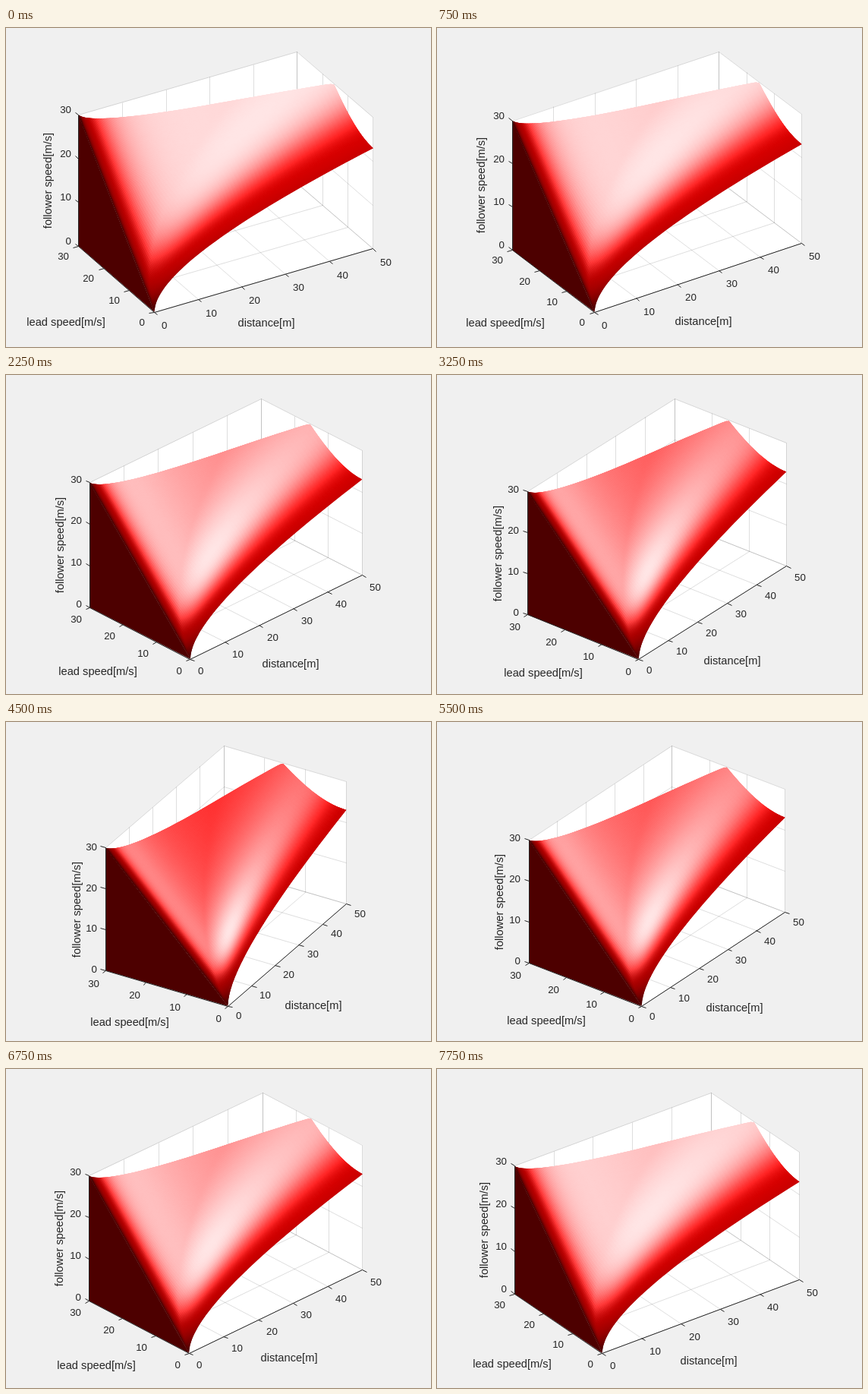
Write an HTML page with a canvas that moves like this. It is 560x420 px and loops after 8000 ms.

```html
<!DOCTYPE html>
<html lang="en">
<head>
<meta charset="utf-8">
<title>Safe following speed surface</title>
<style>
  html, body { margin: 0; width: 100%; height: 100%; overflow: hidden; background: #f0f0f0; }
  canvas, svg { position: absolute; left: 0; top: 0; width: 560px; height: 420px; }
  text { font: 13.33px "Liberation Sans", Arial, sans-serif; fill: #262626; }
  text.label { font-size: 14.67px; text-anchor: middle; }
</style>
</head>
<body>
<canvas id="plot" width="560" height="420"></canvas>
<svg id="labels" viewBox="0 0 560 420"></svg>
<script>
const LOOP = 8000, STEP = 250, TURN = 17;
const MAX_X = 50, MAX_Y = 30, MAX_Z = 30;
const LEAD_BRAKE = 3.5, FOLLOW_BRAKE = 5.3;
const BOX = { cx: 289.8, bottom: 374, height: 342.5 };
const SIN_EL = 0.5, COS_EL = Math.sqrt(3) / 2;
const LIGHT_TURN = Math.PI / 10;
const LIGHT = [0.5 * Math.sin(LIGHT_TURN), -0.5 * Math.cos(LIGHT_TURN), COS_EL];
const COLS = 120, ROWS = 80, TICK = 1.2;

const ctx = document.getElementById("plot").getContext("2d");
const svg = document.getElementById("labels");
const dot = (a, b) => a[0] * b[0] + a[1] * b[1] + a[2] * b[2];
const range = max => Array.from({ length: max / 10 + 1 }, (_, i) => i * 10);

// Distance needed when the lead car brakes, with its slopes in y and z.
function gap(y, z) {
  if (z <= y) return [0, 0, 0];
  if (z / FOLLOW_BRAKE <= y / LEAD_BRAKE) {
    const diff = FOLLOW_BRAKE - LEAD_BRAKE, slope = (z - y) / diff;
    return [(z - y) * slope / 2, -slope, slope];
  }
  return [
    z * z / (2 * FOLLOW_BRAKE) - y * y / (2 * LEAD_BRAKE),
    -y / LEAD_BRAKE,
    z / FOLLOW_BRAKE
  ];
}

function topSpeed(y) {
  const reach = MAX_X + y * y / (2 * LEAD_BRAKE);
  return Math.min(MAX_Z, Math.sqrt(2 * FOLLOW_BRAKE * reach));
}

function vertex(i, j) {
  const y = MAX_Y * i / COLS;
  const z = y + (topSpeed(y) - y) * j / ROWS;
  const [x, dy, dz] = gap(y, z);
  const len = Math.hypot(1, dy, dz);
  return { pos: [x, y, z], normal: [-1 / len, dy / len, dz / len] };
}

const mesh = Array.from({ length: COLS + 1 }, (_, i) =>
  Array.from({ length: ROWS + 1 }, (_, j) => vertex(i, j)));

function shade(normal, eye) {
  const facing = Math.max(0, dot(normal, LIGHT));
  const mirror = normal.map((n, i) => 2 * facing * n - LIGHT[i]);
  const shine = facing > 0 ? 0.9 * Math.max(0, dot(mirror, eye)) ** 10 : 0;
  return [0.3 + 0.6 * facing + shine, shine];
}

function camera(deg) {
  const a = deg * Math.PI / 180, sin = Math.sin(a), cos = Math.cos(a);
  const scale = BOX.height / ((MAX_X * sin + MAX_Y * cos) * SIN_EL + MAX_Z * COS_EL);
  const left = BOX.cx - scale * (MAX_X * cos + MAX_Y * sin) / 2;
  const originX = left + scale * MAX_Y * sin;
  return {
    sin, cos, turn: deg - 30,
    eye: [-sin * COS_EL, -cos * COS_EL, SIN_EL],
    project: (x, y, z) => [
      originX + scale * (x * cos - y * sin),
      BOX.bottom - scale * ((x * sin + y * cos) * SIN_EL + z * COS_EL)
    ]
  };
}

function trace(points) {
  ctx.beginPath();
  points.forEach(([x, y]) => ctx.lineTo(x, y));
}

function polygon(points, fill) {
  trace(points);
  ctx.closePath();
  ctx.fillStyle = fill;
  ctx.fill();
}

// Line ends sit on pixel centres, so upright lines stay sharp.
function line(cam, from, to) {
  const ends = [from, to].map(p => cam.project(...p).map(v => Math.floor(v) + 0.5));
  trace(ends);
  ctx.stroke();
}

function drawWalls(cam) {
  const corners = [[0, 0, 0], [0, 30, 0], [0, 30, 30], [50, 30, 30], [50, 0, 30], [50, 0, 0]];
  polygon(corners.map(c => cam.project(...c)), "#fff");
  ctx.strokeStyle = "rgba(38,38,38,.15)";
  ctx.lineWidth = 1;
  for (const x of range(MAX_X)) {
    line(cam, [x, 0, 0], [x, MAX_Y, 0]);
    line(cam, [x, MAX_Y, 0], [x, MAX_Y, MAX_Z]);
  }
  for (const y of range(MAX_Y)) {
    line(cam, [0, y, 0], [MAX_X, y, 0]);
    line(cam, [MAX_X, y, 0], [MAX_X, y, MAX_Z]);
  }
  for (const z of range(MAX_Z)) {
    line(cam, [0, MAX_Y, z], [MAX_X, MAX_Y, z]);
    line(cam, [MAX_X, 0, z], [MAX_X, MAX_Y, z]);
  }
}

function drawSurface(cam) {
  const wall = [[0, 0, 0], [0, 30, 0], [0, 30, 30]];
  polygon(wall.map(c => cam.project(...c)), "#4d0000");
  const view = mesh.map(col => col.map(v => ({
    at: cam.project(...v.pos), tone: shade(v.normal, cam.eye)
  })));
  // Each patch reaches under the next ones, which hides the seams.
  for (let i = 0; i < COLS; i++) {
    for (let j = 0; j < ROWS; j++) {
      const far = view[Math.min(i + 2, COLS)], up = Math.min(j + 2, ROWS);
      const patch = [view[i][j], far[j], far[up], view[i][up]];
      const near = [view[i][j], view[i + 1][j], view[i + 1][j + 1], view[i][j + 1]];
      const [r, g] = [0, 1].map(c =>
        Math.min(255, Math.round(near.reduce((sum, q) => sum + q.tone[c], 0) * 63.75)));
      polygon(patch.map(q => q.at), `rgb(${r},${g},${g})`);
    }
  }
}

function drawAxes(cam) {
  ctx.strokeStyle = "#262626";
  ctx.lineWidth = 1;
  line(cam, [0, 0, 0], [MAX_X, 0, 0]);
  line(cam, [0, 0, 0], [0, MAX_Y, 0]);
  line(cam, [0, MAX_Y, 0], [0, MAX_Y, MAX_Z]);
  for (const x of range(MAX_X)) line(cam, [x, 0, 0], [x, -TICK, 0]);
  for (const y of range(MAX_Y)) line(cam, [0, y, 0], [-TICK, y, 0]);
  for (const z of range(MAX_Z)) line(cam, [0, MAX_Y, z], [0, MAX_Y + TICK, z]);
}

function addText(content, anchor) {
  const el = document.createElementNS("http://www.w3.org/2000/svg", "text");
  el.textContent = content;
  if (anchor) el.setAttribute("text-anchor", anchor);
  else el.setAttribute("class", "label");
  svg.append(el);
  return el;
}

// Each axis: where a value lies, and how far its text sits from there.
const axes = [
  {
    name: "distance[m]", max: MAX_X, anchor: "start", at: v => [v, 0, 0],
    tick: c => [8.3 + 2.6 * c.sin, 5 + 14.4 * c.cos],
    title: u => [3.5 + 1.05 * u, 56 + 0.355 * u]
  },
  {
    name: "lead speed[m/s]", max: MAX_Y, anchor: "end", at: v => [0, v, 0],
    tick: c => [-2.3 - 12 * c.cos, 8 + 10 * c.sin],
    title: u => [-66.3 + 0.82 * u - 0.0075 * u * u, 56.3 - 0.4 * u]
  },
  {
    name: "follower speed[m/s]", max: MAX_Z, anchor: "end", at: v => [0, MAX_Y, v],
    tick: c => [-8.2 - 3.6 * c.sin, 6 - 15.5 * c.cos],
    title: u => [-39.5 + 0.08 * u, 0.3], upright: true
  }
];
for (const axis of axes) {
  axis.ticks = range(axis.max).map(value => ({ value, el: addText(value, axis.anchor) }));
  axis.label = addText(axis.name);
}

function place(el, [x, y], [dx, dy], upright) {
  const px = Math.round(x + dx + (upright ? 3.6 : 0));
  const py = Math.round(y + dy + (upright ? 0 : 4.7));
  el.setAttribute("transform", `translate(${px} ${py})${upright ? " rotate(-90)" : ""}`);
}

function placeText(cam) {
  for (const axis of axes) {
    for (const { value, el } of axis.ticks) {
      place(el, cam.project(...axis.at(value)), axis.tick(cam));
    }
    place(axis.label, cam.project(...axis.at(axis.max / 2)), axis.title(cam.turn), axis.upright);
  }
}

function angle(step) {
  return step < TURN ? 30 + 1.79 * step : 59.87 - 1.79 * (step - TURN);
}

function draw(step) {
  const cam = camera(angle(step));
  ctx.fillStyle = "#f0f0f0";
  ctx.fillRect(0, 0, 560, 420);
  drawWalls(cam);
  drawSurface(cam);
  drawAxes(cam);
  placeText(cam);
}

let shown = -1;
function tick() {
  const step = Math.max(0, Math.floor(performance.now() % LOOP / STEP) - 1);
  if (step !== shown) draw(shown = step);
  requestAnimationFrame(tick);
}
tick();
</script>
</body>
</html>
```
